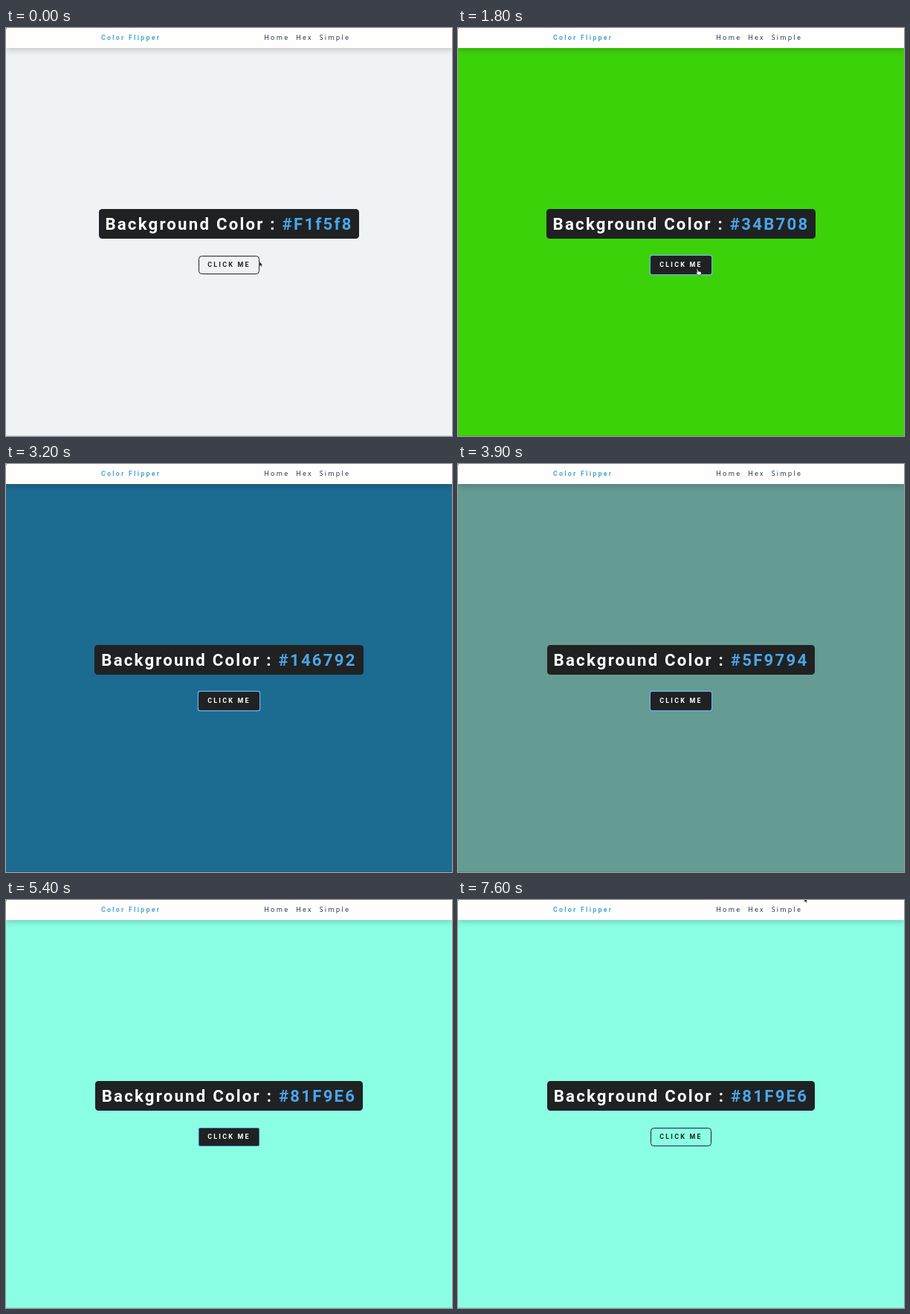
An HTML page for the animation above (7.7 s loop, 600 px wide and 550 px high).

```html
<!DOCTYPE html>
<html lang="en">
<head>
<meta charset="utf-8">
<title>Color Flipper</title>
<style>
  /* 1rem of the page, drawn at reduced scale */
  html { font-size: 8.88px; }
  * { box-sizing: border-box; margin: 0; padding: 0; }
  html, body { width: 600px; height: 550px; overflow: hidden; }
  body { position: relative; font-family: "Open Sans", sans-serif; letter-spacing: .25rem; white-space: nowrap; }
  h2, h4, .btn { font-family: Roboto, sans-serif; font-weight: 700; }
  nav {
    position: absolute; z-index: 1; top: 0; left: 0; width: 600px; height: 3rem;
    background: #fffefd; box-shadow: 0 .3125rem .9375rem rgba(0, 0, 0, .2);
  }
  .bar { width: 344px; height: 100%; margin: 0 auto; display: flex; align-items: center; justify-content: space-between; }
  h4 { font-size: 1rem; color: #49a6d9; }
  ul { display: flex; list-style: none; }
  li { margin-right: 1rem; font-size: 1rem; color: #102a42; }
  main {
    position: absolute; top: 3rem; left: 0; width: 600px; bottom: 0;
    display: flex; flex-direction: column; align-items: center; justify-content: center;
  }
  h2 {
    margin-bottom: 2.5rem; padding: 1rem; border-radius: .5rem;
    background: #202122; color: #fff; font-size: 2.5rem; line-height: 1;
  }
  h2 span { color: #49a6e9; }
  .btn {
    padding: .75rem 1.25rem; border: 1.25px solid #222; border-radius: .5rem;
    color: #222; font-size: 1rem; line-height: 1.172;
  }
  .btn.hover { background: #202122; color: #fff; }
  .btn.focus { border-radius: 2px; box-shadow: 0 0 0 1.2px #6eb1ee; }
  .btn.faint { border-radius: 2px; border-color: #3a6fb0; }
  .edge { position: absolute; z-index: 2; left: 0; bottom: 0; width: 600px; height: 1px; background: rgba(0, 0, 0, .1); }
  svg { position: absolute; z-index: 3; left: 0; top: 0; }
</style>
</head>
<body>
<nav>
  <div class="bar">
    <h4>Color Flipper</h4>
    <ul><li>Home</li><li>Hex</li><li>Simple</li></ul>
  </div>
</nav>
<main>
  <h2>Background Color : <span id="hex"></span></h2>
  <div class="btn" id="btn">CLICK ME</div>
</main>
<div class="edge"></div>
<svg width="600" height="550">
  <path d="M0 0h1.2L0 1.2z" fill="#333"/>
  <path id="arrow" d="M0 0V6.2L1.5 4.9 2.4 7 3.4 6.6 2.5 4.5H4.3z" fill="#111" stroke="#fff" stroke-width=".4"/>
  <path id="hand" d="M0 .2Q.7-.5 1.3.3L2.2 2.9 5.2 3.5Q6.3 3.9 6.2 5.2L5.8 8H2.3L-.8 5.2Q-.9 4.2.2 4.5L1 5z"
    fill="#fff" stroke="#222" stroke-width=".6"/>
  <circle id="ring" cx="322" cy="324.3" r="5.8" fill="none" stroke="#a3261f" stroke-width="1"/>
</svg>
<script>
  const LOOP = 7700, TICK = 100;
  const $ = id => document.getElementById(id);
  const [hex, btn, arrow, hand, ring] = ["hex", "btn", "arrow", "hand", "ring"].map($);

  // time, label, colour as shown on screen
  const flips = [
    [0, "#F1f5f8", "#eff3f6"],
    [800, "#34B708", "#3cd20a"],
    [2400, "#146792", "#1c6b91"],
    [3600, "#5F9794", "#649b92"],
    [4700, "#1F7C38", "#268935"],
    [5200, "#81F9E6", "#8affe3"]
  ];
  // time, button class
  const looks = [[0, ""], [100, "hover"], [800, "hover focus"], [5200, "hover faint"], [6000, ""]];
  // time, x, y of the pointer tip
  const path = [[0, 341, 315], [300, 321, 325], [6000, 321, 325], [6100, 466, -3], [LOOP, 466, -3]];

  const at = (steps, t) => steps.filter(s => s[0] <= t).pop();
  const show = (el, on) => el.style.display = on ? "" : "none";

  function pointer(t) {
    const i = path.findIndex(p => p[0] > t), a = path[i - 1], b = path[i];
    const k = (t - a[0]) / (b[0] - a[0]), e = k * (2 - k);
    return [a[1] + (b[1] - a[1]) * e, a[2] + (b[2] - a[2]) * e];
  }

  function draw(t) {
    const [start, label, color] = at(flips, t);
    const [x, y] = pointer(t);
    const clicking = start > 0 && t - start < 200;
    document.body.style.background = color;
    if (hex.textContent !== label) hex.textContent = label;
    btn.className = "btn " + at(looks, t)[1];
    for (const el of [arrow, hand]) el.setAttribute("transform", `translate(${x} ${y})`);
    show(arrow, t < 100 || t >= 6000);
    show(hand, t >= 100 && t < 2400 && !clicking);
    show(ring, clicking);
  }

  const begin = performance.now();
  function frame() {
    const t = (performance.now() - begin) % LOOP;
    draw(Math.floor(t / TICK) * TICK);
    requestAnimationFrame(frame);
  }
  frame();
</script>
</body>
</html>
```
